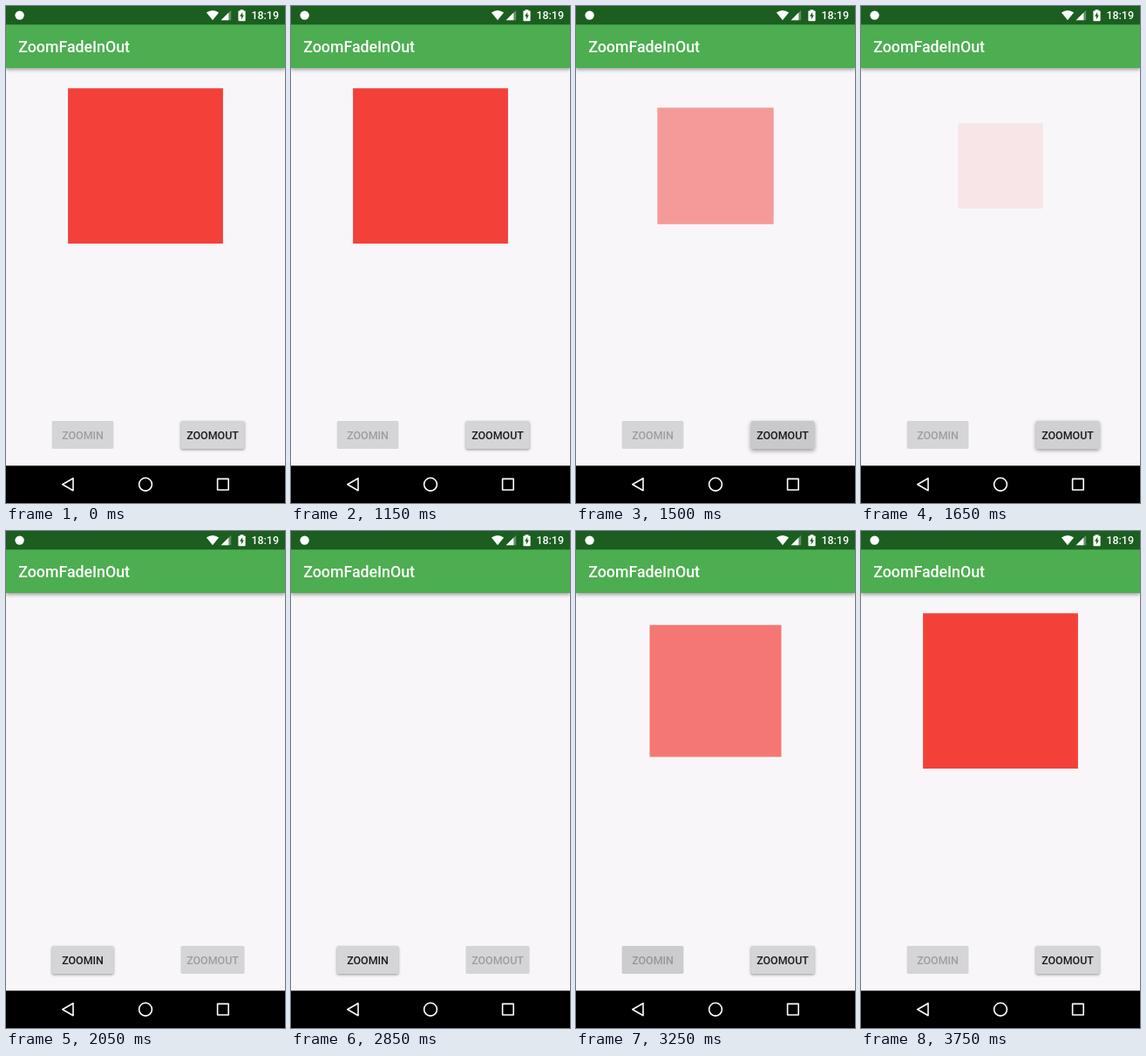
Animation of 320x569 px, one loop 3.8 s. Source, as an HTML page with a canvas:

```html
<!DOCTYPE html>
<html lang="en">
<head>
<meta charset="utf-8">
<title>ZoomFadeInOut</title>
<style>
html, body { margin: 0; width: 100%; height: 100%; overflow: hidden; background: #f8f6f9; }
canvas { display: block; width: 320px; height: 569px; }
</style>
</head>
<body>
<canvas id="stage"></canvas>
<script>
const W = 320, H = 569, LOOP = 3800, STEP = 50;
const OUT_START = 1250, IN_START = 2935, ZOOM = 500;
const OUT_TAP = 1150, IN_TAP = 2850;
const OUT_DONE = 1750, IN_BEGUN = 2950;
const canvas = document.getElementById('stage');
const ctx = canvas.getContext('2d');
const dpr = window.devicePixelRatio || 1;
canvas.width = Math.round(W * dpr);
canvas.height = Math.round(H * dpr);

const clamp = v => Math.min(1, Math.max(0, v));
const progress = (t, start, length) => clamp((t - start) / length);
const ease = p => 0.5 - Math.cos(Math.PI * p) / 2;

function rect(x, y, w, h, color) {
  ctx.fillStyle = color;
  ctx.fillRect(x, y, w, h);
}

function polygon(points) {
  ctx.beginPath();
  points.forEach(([x, y]) => ctx.lineTo(x, y));
  ctx.closePath();
}

function fillPolygon(points, color) {
  polygon(points);
  ctx.fillStyle = color;
  ctx.fill();
}

function text(str, x, y, size, color, align = 'left') {
  ctx.font = `500 ${size}px Roboto, sans-serif`;
  ctx.textAlign = align;
  ctx.fillStyle = color;
  ctx.fillText(str, x, y);
}

function roundRect(x, y, w, h, r) {
  ctx.beginPath();
  ctx.roundRect(x, y, w, h, r);
}

function shadow(color, blur, dy) {
  ctx.shadowColor = color;
  ctx.shadowBlur = blur * dpr;
  ctx.shadowOffsetY = dy * dpr;
}

function wifi() {
  ctx.beginPath();
  ctx.moveTo(237, 16.3);
  ctx.lineTo(229.9, 7.4);
  ctx.quadraticCurveTo(237, 2.4, 244.1, 7.4);
  ctx.closePath();
  ctx.fillStyle = '#fff';
  ctx.fill();
}

function signal() {
  fillPolygon([[246.6, 16.3], [258.2, 16.3], [258.2, 4.7]], 'rgba(255,255,255,.3)');
  fillPolygon([[246.6, 16.3], [255.4, 16.3], [255.4, 7.5]], '#fff');
}

function battery() {
  rect(268.6, 4.2, 3.8, 2, '#fff');
  roundRect(266.4, 5.4, 8.2, 11.8, 0.8);
  ctx.fillStyle = '#fff';
  ctx.fill();
  fillPolygon([[271.2, 6.9], [268.1, 11.8], [270, 11.8], [269.8, 15.6],
    [272.9, 10.6], [271.2, 10.6]], '#1b5e20');
}

function bars() {
  ctx.save();
  shadow('rgba(0,0,0,.35)', 4, 1.6);
  rect(0, 21, W, 50, '#4cae50');
  ctx.restore();
  rect(0, 0, W, 21.3, '#1b5e20');
  text('ZoomFadeInOut', 14.2, 53, 17.78, '#fff');

  ctx.beginPath();
  ctx.arc(15.6, 10.6, 5.2, 0, 2 * Math.PI);
  ctx.fillStyle = '#fff';
  ctx.fill();
  wifi();
  signal();
  battery();
  text('18:19', 313, 15.3, 12.44, '#fff', 'right');
}

function navigation() {
  rect(0, 526.3, W, H - 526.3, '#000');
  ctx.strokeStyle = '#fff';
  ctx.lineWidth = 1.6;
  ctx.lineJoin = 'round';
  polygon([[64.8, 547.7], [77, 540.7], [77, 554.7]]);
  ctx.stroke();
  ctx.beginPath();
  ctx.arc(160, 547.7, 7.4, 0, 2 * Math.PI);
  ctx.stroke();
  ctx.strokeRect(242.6, 541.4, 12.6, 12.6);
}

// lift: 0 disabled, 1 resting; press: age of the tap in ms
function button(label, x, w, enabled, lift, press) {
  const y = 475, h = 32;
  const active = press >= 0 && press < 600;
  const raise = active ? Math.sin(Math.PI * press / 600) : 0;
  ctx.save();
  if (lift > 0) shadow(`rgba(0,0,0,${0.38 * lift})`, 3 + 2 * raise, 1.3 + raise);
  roundRect(x, y, w, h, 1.8);
  ctx.fillStyle = '#d5d4d7';
  ctx.fill();
  ctx.restore();

  if (active) {
    ctx.save();
    roundRect(x, y, w, h, 1.8);
    ctx.clip();
    ctx.beginPath();
    ctx.arc(x + w / 2, y + h / 2, 8 + 34 * progress(press, 0, 250), 0, 2 * Math.PI);
    const strength = progress(press, 0, 100) * (1 - progress(press, 150, 450));
    ctx.fillStyle = `rgba(0,0,0,${0.1 * strength})`;
    ctx.fill();
    ctx.restore();
  }
  const ink = enabled ? 'rgba(0,0,0,.87)' : 'rgba(0,0,0,.26)';
  text(label, x + w / 2, 495.6, 12.44, ink, 'center');
}

function square(alpha) {
  if (alpha <= 0) return;
  const size = 177.8 * (0.5 + 0.5 * alpha);
  ctx.globalAlpha = alpha;
  rect(160 - size / 2, 183.1 - size / 2, size, size, '#f3413a');
  ctx.globalAlpha = 1;
}

function draw(t) {
  const hidden = t >= OUT_DONE && t < IN_BEGUN;
  const out = ease(progress(t, OUT_START, ZOOM));
  const back = ease(progress(t, IN_START, ZOOM));
  const inLift = progress(t, OUT_DONE, 150) - progress(t, IN_BEGUN, 150);

  ctx.setTransform(dpr, 0, 0, dpr, 0, 0);
  rect(0, 0, W, H, '#f8f6f9');
  square(1 - out + back);
  bars();
  button('ZOOMIN', 52.6, 70.8, hidden, inLift, t - IN_TAP);
  button('ZOOMOUT', 200.4, 73.2, !hidden, 1 - inLift, t - OUT_TAP);
  navigation();
}

const begin = performance.now();
function frame() {
  const t = (performance.now() - begin) % LOOP;
  draw(Math.floor(t / STEP) * STEP);
  requestAnimationFrame(frame);
}
frame();
</script>
</body>
</html>
```
